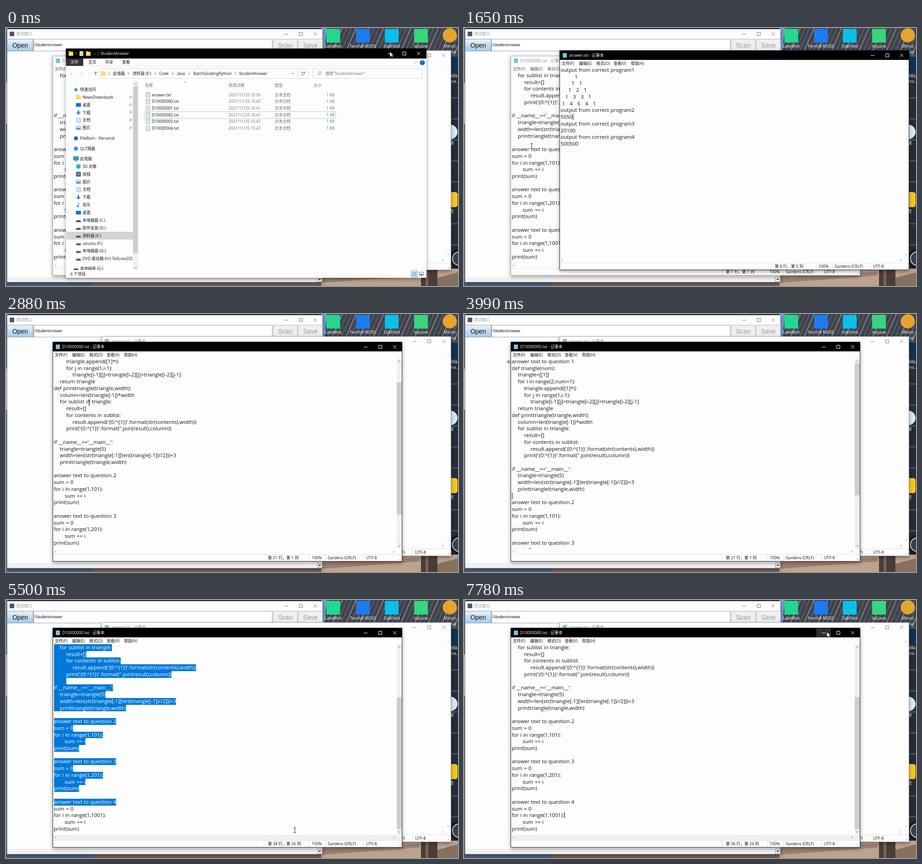
These frames come from a looping animation (989x566 px, 8000 ms). An HTML page:

```html
<!DOCTYPE html>
<html lang="en">
<head>
<meta charset="utf-8">
<title>Comparing text files</title>
<style>
html, body { margin: 0; width: 100%; height: 100%; overflow: hidden; }
body { position: relative; background: #262d3a; color: #111;
  font: 8.7px "Open Sans", "Noto Sans CJK SC", "Noto Sans CJK JP", sans-serif; }
body > *, .desk > *, .win > *, .stage > *, .side .t { position: absolute; }
svg { position: absolute; left: 0; top: 0; overflow: visible; fill: none; }
.t { line-height: 16px; white-space: pre; }
.mid { transform: translateX(-50%); }
.right { transform: translateX(-100%); }
.white { color: #fff; }
.grey { color: #6d6d6d; }
.pale { color: #999; }
.win { background: #fdfdfd; box-shadow: 0 3px 8px rgba(0, 0, 0, .38); }
.box { box-sizing: border-box; }
.stage { left: -131px; top: -45px; width: 989px; height: 566px; }
.side { left: 131px; top: 112px; width: 147px; height: 419px; overflow: hidden; }
.side > div { position: absolute; left: -131px; top: -112px; }

.swing { font-family: "Liberation Sans", Arial, sans-serif; }
.btn { font-size: 14px; text-align: center; line-height: 26px; box-sizing: border-box; }

.pad { width: 765px; height: 482px; outline: 1px solid #aaa; outline-offset: -1px; }
.pad .bar { left: 0; top: 0; width: 765px; height: 21px; }
.pad .name { color: #8a8a8a; }
.pad .ctl { stroke: #888; }
.pad .menu { color: #555; }
.pad.on { outline-color: #333; }
.pad.on .bar { background: #000; }
.pad.on .name { color: #fff; }
.pad.on .ctl { stroke: #fff; }
.pad.on .menu { color: #111; }
.text { left: 2.5px; top: 36px; width: 750px; height: 418px; overflow: hidden;
  font-size: 11.4px; word-spacing: .5px; }
.rows { position: absolute; top: 0; left: 0; }
.rows div { position: relative; width: max-content; height: 14.74px; line-height: 14.74px;
  white-space: pre; tab-size: 8; }
.rows .sel { background: #0078d7; color: #fff; }
.rows .caret::after { content: ""; position: absolute; right: -1px; top: 0; width: 1px; height: 14px; background: #000; }
.rows .caret:first-child::after { left: 0; }
.hover { background: #2e2e2e; }
#cursor { z-index: 9; }
</style>
</head>
<body>
<script>
const txt = (x, y, s, cls = '') =>
  `<span class="t ${cls}" style="left:${x}px;top:${y - 8}px">${s}</span>`;
const box = (x, y, w, h, css, cls = 'box', body = '') =>
  `<div class="${cls}" style="left:${x}px;top:${y}px;width:${w}px;height:${h}px;${css}">${body}</div>`;
const rect = (x, y, w, h, fill, more = '') =>
  `<rect x="${x}" y="${y}" width="${w}" height="${h}" fill="${fill}" ${more}/>`;
const disc = (x, y, r, fill, more = '') => `<circle cx="${x}" cy="${y}" r="${r}" fill="${fill}" ${more}/>`;
const line = (d, color = '#666', more = '') => `<path d="${d}" stroke="${color}" ${more}/>`;
const svg = body => `<svg width="989" height="566">${body}</svg>`;
const buttons = (x, y) =>
  `M${x - 4} ${y + .5}h8M${x + 28.5} ${y - 3.5}h7v7h-7zM${x + 60} ${y - 3.5}l7 7m0-7l-7 7`;
const chevron = (x, y, dir, color = '#555') => line({
  up: `M${x - 2.5} ${y + 1.5}l2.5-2.5 2.5 2.5`, down: `M${x - 2.5} ${y - 1.5}l2.5 2.5 2.5-2.5`,
  left: `M${x + 1.5} ${y - 2.5}l-2.5 2.5 2.5 2.5`, right: `M${x - 1.5} ${y - 2.5}l2.5 2.5-2.5 2.5`
}[dir], color);

// ---- desktop ----
function desktop() {
  let roof = '';
  for (let i = 0; i < 36; i++)
    roof += line(`M${680 + i * 10} 60l26-60`, i % 3 ? '#5d5a60' : '#8a7a72', 'stroke-width="2.5"');
  let wall = '';
  for (let y = 60; y < 540; y += 46) wall += rect(974, y, 15, 3, '#465062');
  const apps = [[716, '#22d88f', 'LakeMint'], [781, '#1c7cf0', 'Fernhill MOSS'],
    [844, '#0ac0ea', 'OakField'], [908, '#35d67c', 'IvyLane']];
  const labels = [[40, 'Mirvol'], [53, 'Fennel'], [104, 'Corvella'], [117, 'Quellma...'], [253, '录屏'], [402, '便签']];
  return svg(
    rect(0, 0, 989, 566, '#262d3a') + rect(690, 0, 299, 60, '#3c434f') + roof +
    `<path d="M690 0h12l-6 60h-6z" fill="#6f9fce"/>` + wall +
    rect(0, 0, 3, 566, '#5c7fa8') + rect(0, 120, 3, 90, '#dfe6ec') +
    rect(0, 555, 700, 11, '#74605a') + rect(0, 555, 190, 11, '#4d5f7c') +
    rect(690, 528, 299, 38, '#bda28e') + `<path d="M690 545l215-10v8l-215 16z" fill="#9c8172"/>` +
    rect(908, 528, 36, 38, '#4a3d39') + rect(918, 528, 6, 38, '#7d6152') +
    `<path d="M944 548l45-12v30h-45z" fill="#87705f"/>` +
    disc(992, 506, 22, '#181b22') + disc(992, 506, 15, '#39404c', 'stroke="#cfd3d8" stroke-width="2"') +
    apps.map(a => rect(a[0] - 15, 2, 30, 30, a[1])).join('') +
    disc(971, 16, 15.5, '#e5a52c') + rect(957, 63, 31, 31, '#0b3358') +
    disc(972, 228, 16, '#d5ebf7') + rect(957, 360, 31, 33, '#f7c71e', 'rx="5"')) +
    apps.map(a => txt(a[0], 40, a[2], 'white mid')).join('') +
    labels.map(a => txt(971, a[0], a[1], 'white mid')).join('');
}

// ---- small form ----
function form() {
  const dim = 'background:#efefef;border:1px solid #b5b5b5;color:#999';
  return box(0, 0, 691, 556, 'outline:1px solid #9a9a9a;outline-offset:-1px') +
    svg(rect(6, 6, 10, 10, '#555') + line(buttons(611, 11), '#777')) + txt(20, 11, '测试窗口', 'pale') +
    box(0, 22, 58, 27, 'background:linear-gradient(#eaf3fa,#c3dbee 50%,#a9cbe6);border:1px solid #7d98b0', 'btn swing', 'Open') +
    box(58, 22, 523, 27, 'border:1px solid #9aa5ae;background:#fff') + txt(60, 35, '/StudentAnswer', 'swing') +
    box(582, 22, 54, 27, dim, 'btn swing', 'Scan') + box(637, 22, 54, 27, dim, 'btn swing', 'Save') +
    box(1, 544, 689, 11, 'background:#f1f1f1') +
    box(679, 544, 11, 11, 'background:#f6f6f6;border:1px solid #999') +
    svg('<path d="M681.5 548h6l-3 3.5z" fill="#222"/>');
}

// ---- text editors ----
const LINE = 14.74;
function editor(name, rows, side) {
  const menus = ['文件(F)', '编辑(E)', '格式(O)', '查看(V)', '帮助(H)'];
  return '<div class="bar"></div>' +
    box(669, 1, 32, 20, 'visibility:hidden', 'hover') +
    svg(rect(7, 6, 9, 10, '#7fc0d8') + `<path class="ctl" d="${buttons(685, 11)}"/>`) +
    txt(21, 11, name + ' - 记事本', 'name') +
    menus.map((m, i) => txt(5 + i * 37.8, 28.5, m, 'menu')).join('') +
    `<div class="text"><div class="rows">${rows.map(r => `<div>${r}</div>`).join('')}</div></div>` +
    box(1, 454, 763, 12, '', 'track') + side +
    box(1, 466, 763, 15, 'border-top:1px solid #e2e2e2') +
    svg([462, 561, 596, 680].map(x => line(`M${x + .5} 467v14`, '#dcdcdc')).join('') +
      chevron(6, 460, 'left', '#888') + chevron(747, 460, 'right', '#888') +
      line('M757 479l5-5m-2 5l2-2', '#aaa')) +
    txt(471, 474, '', 'pos') + txt(567, 474, '100%') + txt(602, 474, 'Gardens (CRLF)') + txt(686, 474, 'UTF-8');
}

const loopCode = (n, end) =>
  ['', 'answer text to question ' + n, 'sum = 0', `for i in range(1,${end}):`, '\tsum += i', 'print(sum)'];
const code = `answer text to question 1
def triangle(num):
    triangle=[[1]]
    for i in range(2,num+1):
        triangle.append([1]*i)
        for j in range(1,i-1):
            triangle[i-1][j]=triangle[i-2][j]+triangle[i-2][j-1]
    return triangle
def printtriangle(triangle,width):
    column=len(triangle[-1])*width
    for sublist in triangle:
        result=[]
        for contents in sublist:
            result.append('{0:^{1}}'.format(str(contents),width))
        print('{0:^{1}}'.format(''.join(result),column))
${' '.repeat(8)}
if __name__=='__main__':
    triangle=triangle(5)
    width=len(str(triangle[-1][len(triangle[-1])//2]))+3
    printtriangle(triangle,width)`.split('\n')
  .concat(loopCode(2, 101), loopCode(3, 201), loopCode(4, 1001));

const pascal = ['1', '1 1', '1 2 1', '1 3 3 1', '1 4 6 4 1']
  .map((r, i) => ' '.repeat(9 - 2 * i) + r.replace(/ /g, '   '));
const head = n => 'output from correct program' + n;
const answers = [head(1), ...pascal, head(2), '5050', head(3), '20100', head(4), '500500'];

// ---- file browser ----
const glyph = {
  folder: (x, y) => rect(x - 5, y - 5, 5, 3, '#e8b93c') + rect(x - 5, y - 4, 10, 9, '#ffd970'),
  desk: (x, y) => rect(x - 5.5, y - 4, 11, 8, '#0a78d6'),
  down: (x, y) => `<path d="M${x - 1.5} ${y - 5}h3v5h3.5l-5 5-5-5h3.5z" fill="#2d7fd6"/>`,
  doc: (x, y) => rect(x - 4, y - 4.5, 8, 9, '#fff', 'stroke="#8a9aa8"') + line(`M${x - 2} ${y - 1.5}h4m-4 3h4`, '#4f9bd0'),
  pic: (x, y) => rect(x - 5, y - 4, 10, 8, '#fff', 'stroke="#8a9aa8"') + rect(x - 4, y - 1, 8, 4, '#3f97d8'),
  drive: (x, y) => rect(x - 5, y, 10, 4, '#555') + rect(x - 4, y - 1.5, 8, 1.5, '#c4c4c4'),
  cube: (x, y) => rect(x - 4.5, y - 4.5, 9, 9, '#35a7dc'),
  film: (x, y) => rect(x - 5, y - 5, 10, 10, '#444') + rect(x - 3, y - 3, 6, 6, '#7b93b5'),
  note: (x, y) => disc(x - 2, y + 3, 2, '#1b87dc') + line(`M${x} ${y + 3}v-8l3 3`, '#1b87dc'),
  star: (x, y) => `<path d="M${x} ${y - 5}l1.5 3.5 3.5.3-2.7 2.4.9 3.8-3.2-2-3.2 2 .9-3.8-2.7-2.4 3.5-.3z" fill="#2f8de0"/>`,
  blue: (x, y) => disc(x, y, 4.5, '#0f6fc4'),
  sky: (x, y) => disc(x, y, 4.5, '#3b8ee8'),
  pc: (x, y) => rect(x - 5.5, y - 5, 11, 8, '#2d9bdc', 'stroke="#6c7a86"') + line(`M${x - 3} ${y + 5}h6`)
};
function browser() {
  const quick = [['快速访问', 'star'], ['NewsDownloads', 'folder'], ['桌面', 'desk'], ['下载', 'down'], ['文档', 'doc'], ['图片', 'pic']];
  const disks = [['此电脑', 'pc'], ['3D 对象', 'cube'], ['视频', 'film'], ['图片', 'pic'], ['文档', 'doc'], ['下载', 'down'],
    ['音乐', 'note'], ['桌面', 'desk'], ['本地磁盘 (C:)', 'drive'], ['软件安装 (D:)', 'drive'], ['资料盘 (E:)', 'drive'],
    ['ubuntu (F:)', 'drive'], ['本地磁盘 (G:)', 'drive'], ['DVD 驱动器 (H:) TeXLive202', 'drive']];
  const tree = (list, y0) => list.map(([s, g], i) => [s, g, y0 + i * 16.87, i ? 5.5 : 0]);
  const items = [...tree(quick, 135), ['FileBarn - Personal', 'blue', 242, 0], ['QLT网盘', 'sky', 264.5, 0],
    ...tree(disks, 287), ['本地磁盘 (G:)', 'drive', 528, 0]];
  const pins = [1, 2, 3, 4, 5].map(i => line(`M269 ${138 + i * 16.87}l2.5-2.5m-1-2.5l4 4m-3-4l2-1.5 2 2-1.5 2`, '#777')).join('');
  const side = `<div class="side"><div>${box(132, 447, 146, 17, 'position:absolute;background:#d4d4d4')}` +
    svg(items.map(([, g, y, dx]) => glyph[g](153 + dx, y)).join('') + pins) +
    items.map(([s, , y, dx]) => txt(162 + dx, y, s)).join('') + '</div></div>';

  const crumbs = [[234, '此电脑'], [277, '资料盘 (E:)'], [335, 'Code'], [375, 'Java'], [410, 'BatchGradingPython'], [510, 'StudentAnswer']];
  const times = ['15:56', '15:47', '16:41', '16:41', '15:47', '15:47'];
  const files = times.map((time, i) => {
    const y = 146.5 + i * LINE;
    return txt(319, y, i ? `D1000000${i - 1}.txt` : 'answer.txt') + txt(487, y, '2021/11/25 ' + time, 'grey') +
      txt(588, y, '文本文档', 'grey') + txt(719, y, '1 KB', 'grey right');
  }).join('');
  const fileIcons = times.map((_, i) => {
    const y = 141.5 + i * LINE;
    return rect(306.5, y, 8, 10, '#fff', 'stroke="#999"') + line(`M308 ${y + 3}h5m-5 2h5m-5 2h5`, '#aaa', 'stroke-width=".8"');
  }).join('');
  const frame = 'border:1px solid #d9d9d9';

  return '<div class="stage">' +
    box(131, 45, 789, 22, 'background:#000') + box(823, 45, 32, 21, 'visibility:hidden', 'hover') +
    box(131, 67, 38, 16, 'background:#333') + box(131, 83, 789, 1, 'background:#e3e3e3') +
    box(205, 89, 434, 22, frame) + box(638, 89, 24, 22, frame) + box(671, 89, 240, 22, frame) +
    box(302, 183, 420, 16, 'border:1px solid #99d1ff') +
    box(278, 115, 11, 416, 'background:#f0f0f0') + box(278, 128, 11, 366, 'background:#cdcdcd') +
    box(886, 532, 15, 15, 'background:#cce8ff;border:1px solid #66b5ee') +
    svg(line(buttons(839.5, 56), '#fff') + glyph.folder(142, 56) + line('M153.5 52v8m48-8v8', '#777') +
      rect(161, 51, 8, 10, '#fff') + line('M163 56l2 2 3-4', '#333') + glyph.folder(180, 56) + chevron(194, 57, 'down', '#888') +
      chevron(896, 76, 'down', '#888') + disc(911, 76, 5.5, '#0b63b8') +
      line('M148 100h-7m3-3l-3 3 3 3M161 100h7m-3-3l3 3-3 3', '#c5c5c5') + chevron(182, 100, 'down', '#ccc') +
      line('M196 104v-8m-3 3l3-3 3 3', '#444') + glyph.folder(213, 100) +
      [226, 268, 327, 365, 401, 502].map(x => chevron(x, 100, 'right')).join('') + chevron(627, 100, 'down') +
      line('M653 98a3.5 3.5 0 1 0 .3 3.5M653.5 95.5v3h-3', '#555') +
      disc(687, 98.5, 2.8, 'none', 'stroke="#777"') + line('M685 101l-3 3', '#777') +
      chevron(391.5, 118, 'up', '#777') + chevron(283.5, 122, 'up') + chevron(283.5, 526, 'down') + fileIcons +
      line('M889 536.5h3m1 0h5m-9 3h3m1 0h5m-9 3h3m1 0h5', '#3a6f9e') +
      rect(904.5, 535.5, 9, 7, '#fff', 'stroke="#777"') + rect(906, 539, 6, 3, '#3f97d8')) +
    txt(207, 56, 'StudentAnswer', 'white') + txt(141, 75, '文件', 'white') +
    txt(180, 75, '主页') + txt(217, 75, '共享') + txt(254, 75, '查看') + txt(909, 76, '?', 'white') +
    crumbs.map(c => txt(c[0], 100, c[1])).join('') + txt(699, 100, '搜索"StudentAnswer"', 'grey') +
    [[304, '名称'], [487, '修改日期'], [588, '类型'], [673, '大小']].map(h => txt(h[0], 125.5, h[1], 'grey')).join('') +
    files + side + txt(141, 539.5, '6 个项目') + '</div>';
}

const scrollbar = box(753, 36, 11, 418, 'background:#f0f0f0') + box(753, 47, 11, 290, 'background:#cdcdcd', 'thumb') +
  svg(chevron(758.5, 42, 'up') + chevron(758.5, 448, 'down'));
const arrowsOnly = svg(chevron(758.5, 42, 'up', '#aaa') + chevron(758.5, 448, 'down', '#aaa'));
document.body.innerHTML =
  box(0, 0, 989, 566, '', 'desk', desktop()) + box(2, 2, 691, 556, '', 'win', form()) +
  `<div id="code" class="win pad" style="left:102px;top:61px">${editor('D10000000.txt', code, scrollbar)}</div>` +
  `<div id="answer" class="win pad" style="left:209px;top:49px">${editor('answer.txt', answers, arrowsOnly)}</div>` +
  `<div id="files" class="win" style="left:131px;top:45px;width:789px;height:503px">${browser()}</div>` +
  '<svg id="cursor" width="1" height="1"><path/></svg>';

// ---- timeline: every entry holds until the next ----
const moves = [ // ms, x, y, kind
  [0, 840, 52, 'arrow'], [780, 832, 47, 'arrow'], [920, 760, 90, 'beam'], [1040, 620, 150, 'beam'], [1160, 480, 200, 'beam'],
  [1280, 345, 238, 'beam'], [1400, 235, 253, 'beam'], [1520, 168, 259, 'beam'], [1650, 148, 259, 'beam'],
  [2160, 152, 250, 'beam'], [2280, 163, 232, 'beam'], [2400, 175, 212, 'beam'], [2520, 182, 200, 'beam'], [2640, 182, 194, 'beam'],
  [3120, 165, 160, 'beam'], [3240, 125, 122, 'beam'], [3360, 98, 106, 'size'], [3510, 97, 99, 'size'], [3750, 98, 102, 'size'],
  [3990, 99, 105, 'size'], [4110, 106, 104, 'beam'], [4890, 300, 228, 'beam'], [5010, 523, 396, 'beam'], [5130, 600, 475, 'beam'],
  [5250, 632, 505, 'beam'], [5650, 606, 476, 'beam'], [5920, 576, 487, 'beam'], [6040, 556, 500, 'beam'], [6420, 552, 484, 'beam'],
  [6540, 552, 470, 'beam'], [6900, 610, 471, 'beam'], [7020, 650, 462, 'beam'], [7160, 810, 160, 'beam'],
  [7300, 819, 120, 'beam'], [7420, 812, 90, 'arrow'], [7540, 804, 83, 'arrow'], [7660, 797, 74, 'arrow'], [7780, 794, 70, 'arrow']];
const scrolls = [[0, 10], [2760, 7], [2880, 4], [3000, 1], [3120, 0], [5250, 6], [5500, 10]];
const selections = [[0, 0], [4890, 9], [5010, 20], [5130, 26], [5250, 34], [5650, 35], [5920, 36], [6040, 38], [6660, 0]];
const carets = [[0, 0], [1920, 21], [2450, 0], [2980, 21], [3510, 0], [3930, 21], [4250, 1], [4750, 0], [6660, 36], [7160, 0], [7660, 36]];
const places = [[0, 1, 1], [1920, 21, 1], [4250, 1, 1], [6660, 36, 24]];
const answerCarets = [[0, 0], [780, 1], [1160, 0], [1650, 1], [1920, 0]];
const shapes = {
  arrow: ['M0 0V11L2.6 8.6 4.4 12.5 6.2 11.7 4.5 8H8Z', '#fff', '#111', .6],
  beam: ['M-2.5 -5.5H2.5M0 -5.5V5.5M-2.5 5.5H2.5', 'none', '#222', 1],
  size: ['M-5 0L-2 -3V-1H2V-3L5 0 2 3V1H-2V3Z', '#fff', '#111', .8]
};
const at = (list, t) => list.filter(e => e[0] <= t).pop();

const $ = s => document.querySelector(s);
const [codePad, answerPad, filesBox, cursor, pointer] = ['#code', '#answer', '#files', '#cursor', '#cursor path'].map($);
const codeRows = [...document.querySelectorAll('#code .rows div')];
const caretRow = $('#answer .rows').children[7];
const [codeText, thumb, track, pos] = ['.rows', '.thumb', '.track', '.pos'].map(s => $('#code ' + s));
const codeHover = $('#code .hover'), filesHover = $('#files .hover');
$('#answer .pos').textContent = '第 8 行，第 5 列';
const show = (el, on) => el.style.visibility = on ? 'visible' : 'hidden';

function draw() {
  const t = performance.now() % 8000;
  const [, x, y, kind] = at(moves, t);
  const [d, fill, stroke, width] = shapes[kind];
  cursor.style.left = x + 'px';
  cursor.style.top = y + 'px';
  for (const [k, v] of Object.entries({ d, fill, stroke, 'stroke-width': width })) pointer.setAttribute(k, v);

  // the file browser shrinks and fades as it is minimised
  const step = t < 530 ? 0 : t < 650 ? 1 : 2;
  filesBox.style.display = t < 780 ? '' : 'none';
  filesBox.style.opacity = 1 - step * .4;
  filesBox.style.transform = step ? `translateY(${step * 25}px) scale(${1 - step * .06})` : '';
  show(filesHover, t >= 120 && t < 780);
  show(codeHover, t >= 7660);

  const front = t >= 1920;
  codePad.classList.toggle('on', front);
  codePad.style.zIndex = front ? 1 : 0;
  answerPad.classList.toggle('on', t >= 530 && !front);
  caretRow.classList.toggle('caret', !!at(answerCarets, t)[1]);

  const scroll = at(scrolls, t)[1], sel = at(selections, t)[1], caret = at(carets, t)[1];
  codeText.style.top = -scroll * LINE + 'px';
  thumb.style.top = 47 + scroll * 10.5 + 'px';
  codeRows.forEach((row, i) => {
    row.classList.toggle('sel', i < sel);
    row.classList.toggle('caret', i + 1 === caret);
  });
  const [, ln, col] = sel ? [0, sel, code[sel - 1].length + 1] : at(places, t);
  pos.textContent = `第 ${ln} 行，第 ${col} 列`;
  track.style.background = t < 4250 ? 'none' : '#f0f0f0';
  track.style.width = (t < 5130 ? 543 : 763) + 'px';
  requestAnimationFrame(draw);
}
draw();
</script>
</body>
</html>
```
